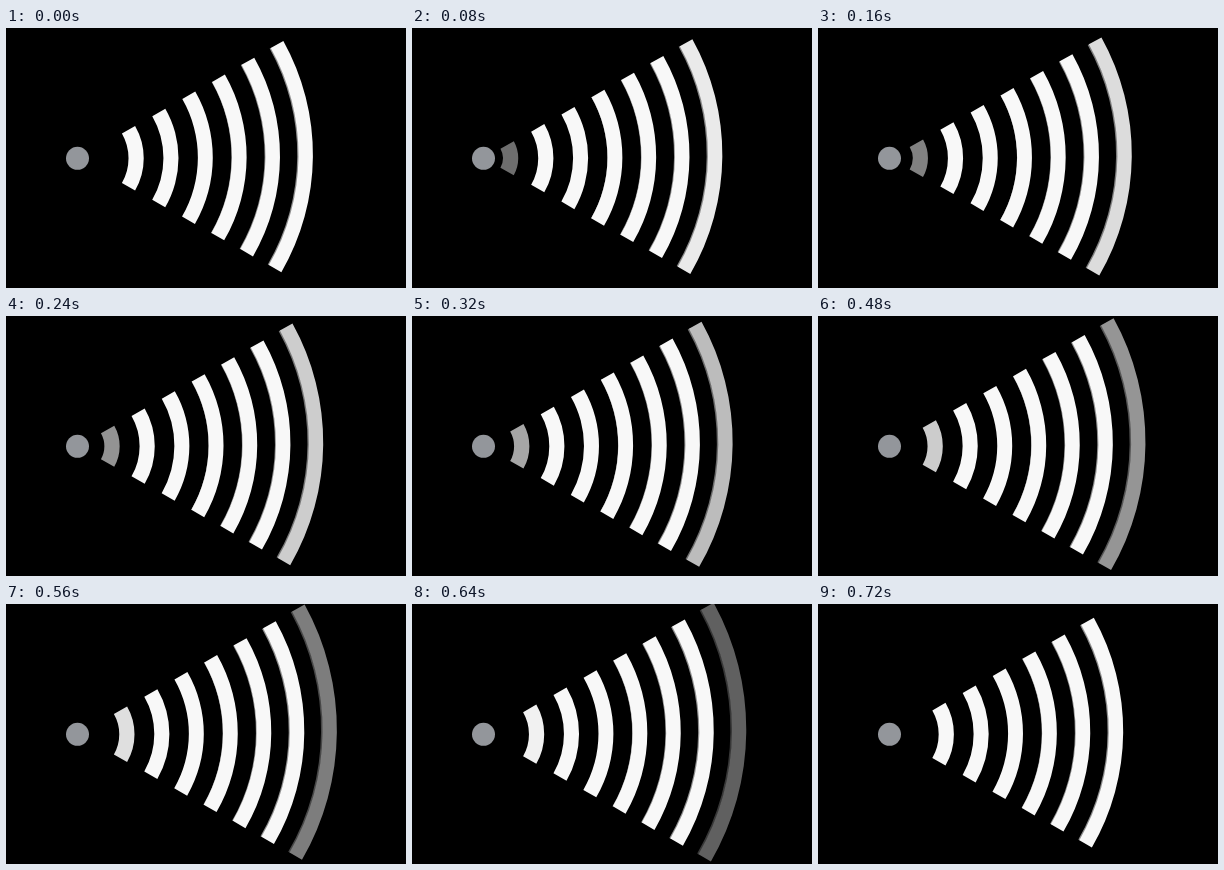
These frames come from a looping animation (400x260 px, 0.76 s). An HTML page with a canvas:

```html
<!DOCTYPE html>
<html lang="en">
<head>
<meta charset="utf-8">
<title>Signal waves</title>
<style>
  html, body { margin: 0; width: 100%; height: 100%; overflow: hidden; background: #000; }
  canvas { display: block; width: 400px; height: 260px; }
</style>
</head>
<body>
<canvas id="stage" width="400" height="260"></canvas>
<script>
const ctx = document.getElementById('stage').getContext('2d');
const STEP = 40, STEPS = 19;
const WHITE = 248;

const gray = v => `rgb(${v}, ${v}, ${v})`;

function band(cx, cy, inner, outer, from, to, level) {
  ctx.beginPath();
  ctx.arc(cx, cy, outer, from, to);
  ctx.arc(cx, cy, inner, to, from, true);
  ctx.closePath();
  ctx.fillStyle = gray(level);
  ctx.fill();
}

// u is the wave's distance from the dot, in wave spacings
function wave(u, level) {
  const slow = u * (5 - u); // waves slow down slightly as they travel
  const x1 = 129.1 + 29.65 * u + 0.14 * slow, y1 = 97.9 - 17 * u - 0.05 * slow;
  const x2 = 129.1 + 29.25 * u + 0.22 * slow, y2 = 162.5 + 16.35 * u + 0.13 * slow;
  const r = 64.8 + 33.9 * u;
  const chord = Math.hypot(x2 - x1, y2 - y1);
  const depth = Math.sqrt(r * r - chord * chord / 4);
  const cx = (x1 + x2) / 2 - depth * (y2 - y1) / chord;
  const cy = (y1 + y2) / 2 + depth * (x2 - x1) / chord;
  const from = Math.atan2(y1 - cy, x1 - cx);
  const to = Math.atan2(y2 - cy, x2 - cx);
  const inner = r - 15.2 + 0.15 * u;
  const shade = Math.max(0, (u - 2) * 0.4);
  if (shade) band(cx, cy, inner - shade, inner + 0.5, from, to, level * 0.57);
  band(cx, cy, inner, r, from, to, level);
}

function brightness(k, s) {
  if (k < 0) return s ? Math.min(WHITE, 91 + 9.4 * s) : 0;
  if (k === 5) return s < 18 ? WHITE * Math.sqrt(1 - s / 18.8) : 0;
  return WHITE;
}

function draw(time) {
  const s = Math.floor(time / STEP) % STEPS;
  ctx.fillStyle = '#000';
  ctx.fillRect(0, 0, 400, 260);
  ctx.fillStyle = '#93969b';
  ctx.beginPath();
  ctx.arc(71.5, 130.3, 11.5, 0, Math.PI * 2);
  ctx.fill();
  for (let k = -1; k <= 5; k++) {
    const level = brightness(k, s);
    if (level) wave(k + s / STEPS, level);
  }
}

const start = performance.now();
function tick() {
  draw(performance.now() - start);
  requestAnimationFrame(tick);
}
tick();
</script>
</body>
</html>
```
